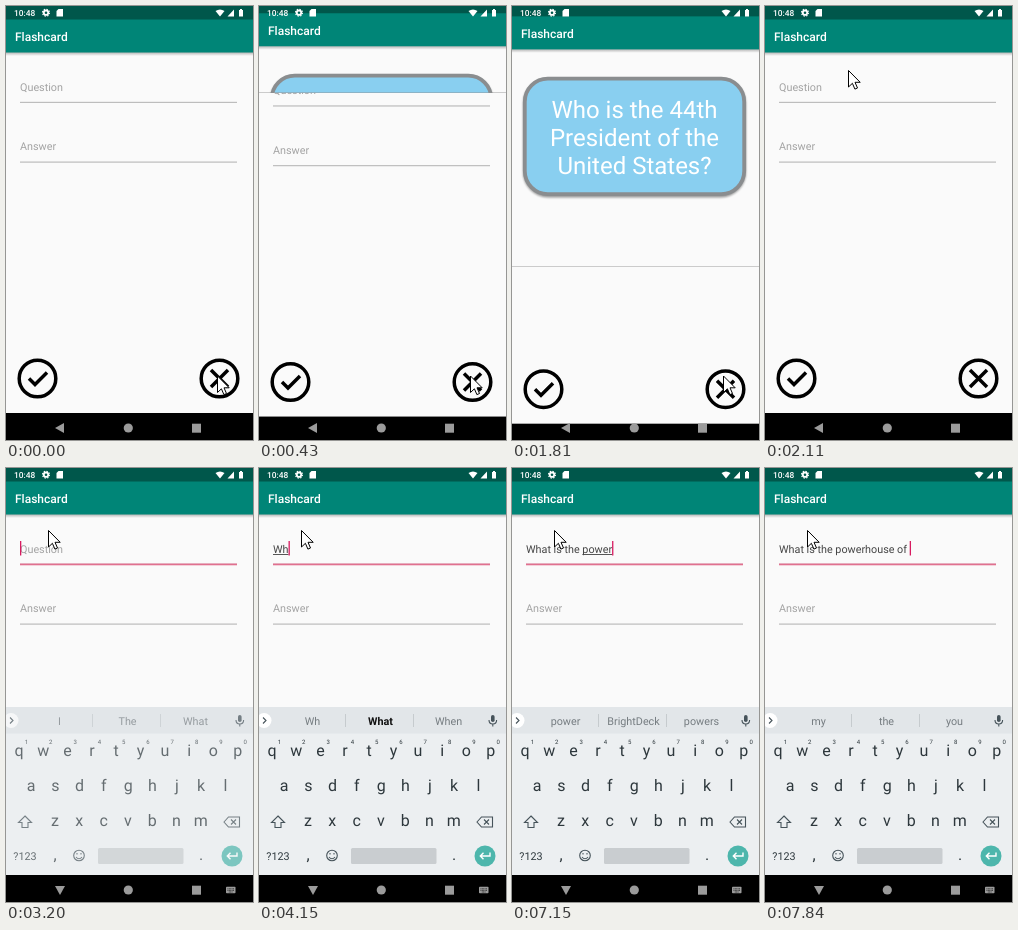
These frames come from a looping animation (247x434 px, 7.99 s). An HTML page:

```html
<!DOCTYPE html>
<html lang="en">
<head>
<meta charset="utf-8">
<title>Flashcard</title>
<style>
html, body { margin: 0; width: 100%; height: 100%; overflow: hidden; background: #000; }
svg { display: block; }
text { font: 10.8px Roboto, sans-serif; white-space: pre; text-rendering: geometricPrecision; }
.mid { text-anchor: middle; }
.line { fill: none; stroke: #000; stroke-width: 3.5; }
.thin { fill: none; stroke: #46535a; stroke-width: 1.1; }
#keys text { fill: #2d373c; }
</style>
</head>
<body>
<svg width="247" height="434" viewBox="0 0 247 434">
  <defs>
    <linearGradient id="shade" x2="0" y2="1">
      <stop stop-color="#000" stop-opacity=".3"/><stop offset="1" stop-color="#000" stop-opacity="0"/>
    </linearGradient>
    <filter id="blur"><feGaussianBlur stdDeviation="1.3"/></filter>
    <clipPath id="reveal"><rect id="clip" width="247" height="434"/></clipPath>
    <g id="window">
      <rect width="247" height="434"/>
      <rect width="247" height="407" fill="#fafafa"/>
      <rect y="46" width="247" height="4" fill="url(#shade)"/>
      <rect width="247" height="46.5" fill="#008577"/>
      <rect width="247" height="13.5" fill="#00574b"/>
      <text x="9" y="35" fill="#fff" style="font-size:12px;font-weight:500">Flashcard</text>
    </g>
  </defs>
  <rect width="247" height="434"/>

  <g id="card">
    <use href="#window"/>
    <rect x="11" y="75.5" width="223" height="119" rx="25" opacity=".4" filter="url(#blur)"/>
    <rect x="12.8" y="75.8" width="219.4" height="115.4" rx="23" fill="#89cff0" stroke="#8a8d8f" stroke-width="3.8"/>
    <g class="mid" fill="#fff" id="prompt"></g>
    <g transform="translate(12 394) rotate(-45)">
      <path d="M1.5 0L14-5.5V5.5Z" fill="#fafafa" stroke="#000" stroke-width="2"/>
      <path d="M0 0L6-3V3ZM13-6.5H38V6.5H13ZM41-6.5H50V6.5H41Z"/>
      <path d="M15-2.3H36M15 2.3H36" stroke="#fafafa" stroke-width="1.2"/>
    </g>
    <circle class="line" cx="213" cy="373" r="18.3"/>
    <path class="line" d="M203 373H223M213 363V383"/>
  </g>

  <g id="form"><g clip-path="url(#reveal)">
    <use href="#window"/>
    <text id="hint" x="14" y="84.5" fill="#a3a3a3">Question</text>
    <text x="14" y="144" fill="#a3a3a3">Answer</text>
    <rect x="14" y="95.8" width="217" height="1.2" fill="#bdbdbd"/>
    <rect x="14" y="155.5" width="217" height="1.2" fill="#bdbdbd"/>
    <rect id="focus" x="14" y="95.5" width="217" height="1.8" fill="#e0708f"/>
    <text id="typed" x="14" y="84.5" fill="#444"></text>
    <rect id="under" y="86" height=".9" fill="#444"/>
    <rect id="caret" y="73" width="1.3" height="14.5" fill="#d81b60"/>
    <circle class="line" cx="31.5" cy="372.5" r="18.3"/>
    <path class="line" d="M23 372.5L29 378.5L41 366.5"/>
    <circle class="line" cx="213.5" cy="372.5" r="18.3"/>
    <path class="line" d="M205 364L222 381M222 364L205 381"/>
  </g></g>

  <g id="board">
    <rect y="239" width="247" height="168" fill="#eceff1"/>
    <rect y="239" width="247" height="26.5" fill="#e2e6e9"/>
    <g id="keys">
      <path d="M86.5 246V259M154.5 246V259" stroke="#c6cbce"/>
      <circle cx="5" cy="252.5" r="7.5" fill="#fff"/>
      <path class="thin" d="M4 249.5L7 252.5L4 255.5"/>
      <rect x="232" y="247" width="3.6" height="7" rx="1.8" fill="#46535a"/>
      <path class="thin" d="M230 252Q230 256 233.8 256T237.6 252M233.8 256V258.5"/>
      <g id="words"></g>
      <g id="letters"></g>
      <path class="thin" d="M19 348L25.5 354.5H22V359.5H16V354.5H12.5Z"/>
      <path class="thin" d="M218 354L222.5 349H233.5V359H222.5ZM225 351.5L230 356.5M230 351.5L225 356.5"/>
      <text class="mid" x="19" y="391.5">?123</text>
      <circle class="thin" cx="73" cy="387.5" r="5.3"/>
      <path class="thin" d="M70 389Q73 392.5 76 389M71 385V386.5M75 385V386.5"/>
      <rect x="92" y="380" width="85.5" height="16" rx="1.5" fill="#c9cdd0"/>
      <circle cx="226" cy="388" r="10.5" fill="#4db6ac"/>
      <path d="M231 384.5V388H221.5M224.5 384.8L221.3 388L224.5 391.2" fill="none" stroke="#fff" stroke-width="1.4"/>
    </g>
  </g>

  <g fill="#fff">
    <text x="8" y="9.8" style="font-size:8.4px;font-weight:500">10:48</text>
    <circle cx="40" cy="6.7" r="2.2" fill="none" stroke="#fff" stroke-width="1.8"/>
    <circle cx="40" cy="6.7" r="3.5" fill="none" stroke="#fff" stroke-width="1.1" stroke-dasharray="1.4 1.35"/>
    <path d="M52.5 3H57V10.5H50.5V5Z"/>
    <path d="M209.5 5Q214 1.8 218.5 5L214 10.5ZM221.5 10.5L228 3.5V10.5ZM233 4H234V3H236V4H237V10.5H233Z"/>
  </g>
  <g fill="#9b9b9b">
    <path id="back" d="M49 422L58 417V427Z"/>
    <circle cx="122.3" cy="422" r="4.6"/>
    <rect x="186" y="417.7" width="9" height="9"/>
    <g id="switcher">
      <rect x="220" y="418.8" width="9.5" height="6.4" rx=".8"/>
      <path d="M221.5 420.8H228M221.5 422.4H228M222.8 424H226.7" stroke="#000" stroke-width=".7" stroke-dasharray=".9 .5"/>
    </g>
  </g>
  <path id="mouse" d="M0 0V16.5L3.9 12.8L6.4 18.6L9 17.5L6.5 11.8H11.7Z" fill="#fff" stroke="#000"/>
</svg>
<script>
const LOOP = 7990, LEFT = 14;
const $ = id => document.getElementById(id);
const set = (id, name, value) => $(id).setAttribute(name, value);
const show = (id, on) => set(id, 'visibility', on ? 'visible' : 'hidden');
const label = (x, y, size, s, extra = '') =>
  `<text class="mid" x="${x}" y="${y}" style="font-size:${size}px;${extra}">${s}</text>`;
const pen = document.createElement('canvas').getContext('2d');
const width = s => { pen.font = '10.8px Roboto, sans-serif'; return pen.measureText(s).width; };

// Every track is a list of [start, ...values]; a value holds until the next start.
const cover = [[0, 1], [430, .8], [590, .07], [730, 0], [1690, .01], [1810, .4], [1960, .9], [2110, 1]];
const pointer = [[0, 211.5, 370], [1960, 147, 217], [2110, 83.5, 64.5], [3200, 42.5, 62.5]];
const focus = [[0, 0], [2380, .35], [2500, .7], [2620, 1]];
const caret = [[0, 0], [2380, 1], [3050, 0], [3200, 1], [3600, 0], [3880, 1]];
// A star marks the suggestion that will be applied.
const typing = [
  [0, '', 'I,The,What'],
  [3880, 'W', 'W,We,What'],
  [4150, 'Wh', 'Wh,*What,When'],
  [4270, 'Wha', 'Wha,*What,Whats'],
  [4390, 'What', 'What,Whats,What’s'],
  [4540, 'What ', 'is,are,do'],
  [4660, 'What i', 'i,*is,in'],
  [4780, 'What is ', 'the,your,a'],
  [4910, 'What is th', 'th,*the,that'],
  [5030, 'What is the ', 'best,first,most'],
  [5590, 'What is the p', 'p,*price,plan'],
  [5730, 'What is the po', 'po,*point,position'],
  [5850, 'What is the powe', 'powe,*power,powered'],
  [5970, 'What is the poweh', 'poweh,*power,powers'],
  [6090, 'What is the powehou', 'powehou,*powerhouse,powerful'],
  [6210, 'What is the powehous', 'powehous,*powerhouse,Powerhouse'],
  [6620, 'What is the powehou', 'powehou,*powerhouse,powerful'],
  [6760, 'What is the poweh', 'poweh,*power,powers'],
  [6880, 'What is the powe', 'powe,*power,powered'],
  [7000, 'What is the pow', 'pow,*power,powder'],
  [7150, 'What is the power', 'power,BrightDeck,powers'],
  [7280, 'What is the powerh', 'powerh,*powerhouse,Powerhouse'],
  [7420, 'What is the powerhou', 'powerhou,*powerhouse,Powerhouse'],
  [7580, 'What is the powerhouse ', 'of,is,in'],
  [7720, 'What is the powerhouse of', 'of,off,often'],
  [7840, 'What is the powerhouse of ', 'my,the,you']
];
const at = (track, t) => track.findLast(key => key[0] <= t).slice(1);

$('prompt').innerHTML = ['Who is the 44th', 'President of the', 'United States?']
  .map((s, i) => label(122.5, 115 + 28 * i, 24, s)).join('');
const row = (chars, x, y) =>
  [...chars].map((c, i) => label(x + 24.3 * i, y, 16, c)).join('');
$('letters').innerHTML = row('qwertyuiop', 13, 288) + row('asdfghjkl', 25, 323) +
  row('zxcvbnm', 49, 358) + row(',', 49, 392) + row('.', 195, 392) +
  [...'1234567890'].map((c, i) => label(20.5 + 24.3 * i, 276, 6, c)).join('');

function draw(t) {
  const [s] = at(cover, t), [x, y] = at(pointer, t);
  set('card', 'transform', `translate(0 ${-7.8 * s})`);
  set('form', 'transform', `translate(0 ${17.8 * (1 - s)})`);
  set('clip', 'y', 416 * (1 - s));
  set('mouse', 'transform', `translate(${x} ${y})`);

  const [text, words] = at(typing, t);
  const end = width(text), start = width(text.replace(/\S*$/, ''));
  $('typed').textContent = text;
  show('hint', !text);
  set('under', 'x', LEFT + start);
  set('under', 'width', end - start);
  set('caret', 'x', LEFT + end);
  set('caret', 'opacity', at(caret, t)[0]);
  set('focus', 'opacity', at(focus, t)[0]);

  show('board', t >= 3200);
  set('keys', 'opacity', t < 3350 ? .7 : 1);
  $('words').innerHTML = words.split(',').map((w, i) => {
    const style = w[0] == '*' ? 'font-weight:700;fill:#111' : 'fill:#757c80';
    return label(53.5 + 68 * i, 256.5, 10.8, w.replace('*', ''), style);
  }).join('');
  show('switcher', t >= 3050);
  set('back', 'transform', t >= 3050 ? 'rotate(-90 54 422)' : '');
}

const begin = performance.now();
(function tick() {
  draw((performance.now() - begin) % LOOP);
  requestAnimationFrame(tick);
})();
</script>
</body>
</html>
```
